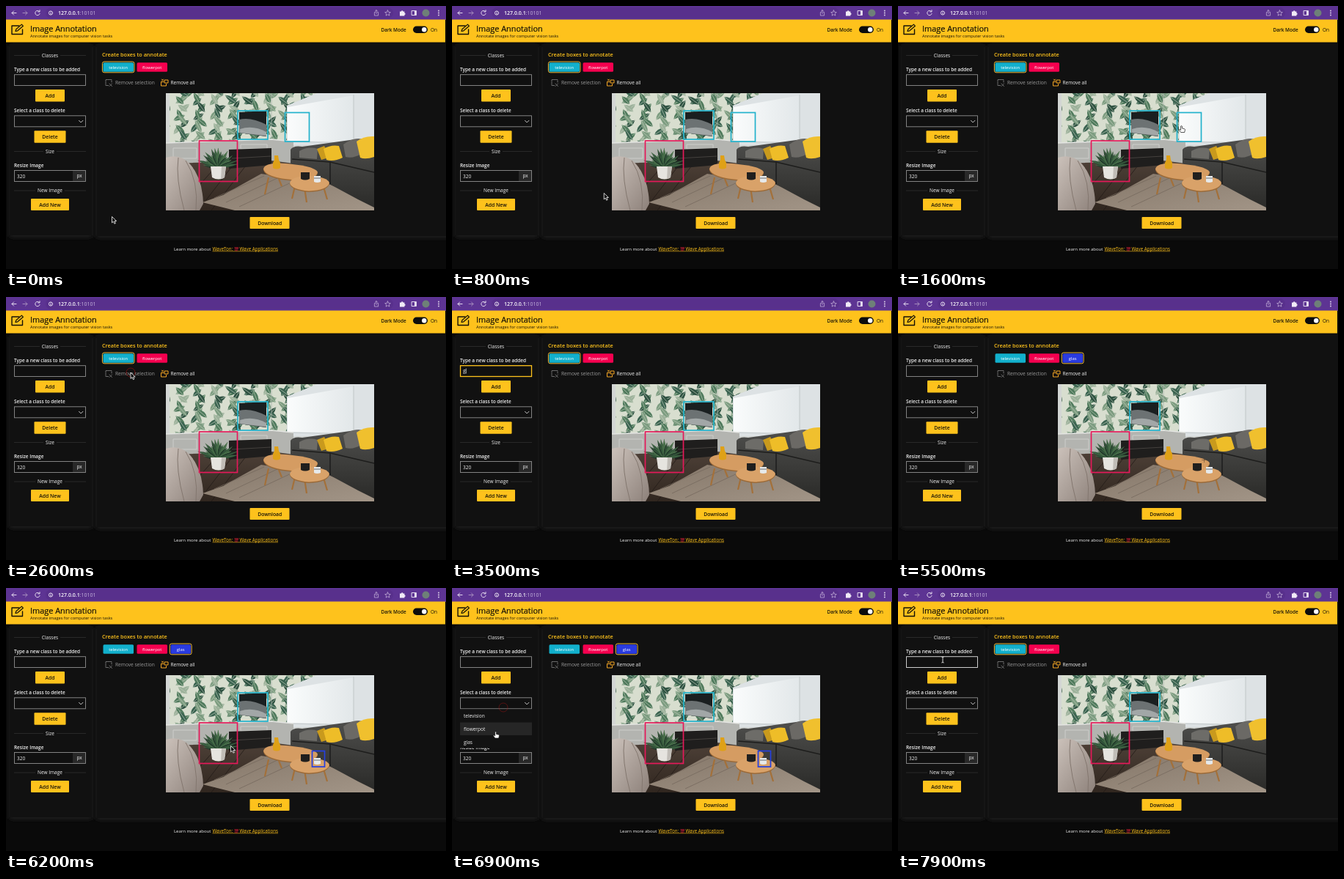
An HTML page that plays this animation: 600x359 px, repeating every 8 s.

```html
<!DOCTYPE html>
<html lang="en">
<head>
<meta charset="utf-8">
<title>Image Annotation</title>
<style>
  html, body { margin: 0; width: 100%; height: 100%; overflow: hidden; background: #0a0a0a; }
  svg { display: block; width: 100vw; height: 100vh; }
  text { font: 400 6.5px "Open Sans", "Noto Sans", sans-serif; fill: #f2f2f2; }
  .b { font-weight: 600; font-size: 6.45px; }
  .mid { text-anchor: middle; }
  .dark { fill: #151208; }
  .btn rect { fill: #fec21c; }
  .btn text { font-weight: 600; font-size: 6.8px; fill: #151208; text-anchor: middle; }
  .tag text { font-size: 5.9px; fill: #fff; text-anchor: middle; }
  .field { fill: #101010; stroke: #8e8e8e; stroke-width: .9; }
  .field.hover { stroke: #e0e0e0; }
  .field.focus { stroke: #fec21c; stroke-width: 1.3; }
  .rule { stroke: #303030; stroke-width: .8; }
  .line { fill: none; stroke-width: 1; stroke-linecap: round; stroke-linejoin: round; }
  .box { fill: none; stroke-width: 1.7; }
  .link { fill: #fec21c; }
  #removeSel text { fill: #9a9a9a; }
  #removeSel path { stroke: #707070; }
  #removeSel.on text { fill: #f2f2f2; }
  #removeSel.on path { stroke: #fec21c; }
</style>
</head>
<body>
<svg viewBox="0 0 600 359" preserveAspectRatio="none">
  <defs>
    <filter id="glow" x="-10%" y="-10%" width="120%" height="120%"><feGaussianBlur stdDeviation="3.5"/></filter>
    <filter id="soft"><feGaussianBlur stdDeviation=".6"/></filter>
    <clipPath id="photoClip"><rect x="218" y="119" width="284" height="160"/></clipPath>
    <clipPath id="paperClip"><path id="paper" d="M223 119H424L383 136V184L362 182L223 187Z"/></clipPath>
    <linearGradient id="floor" x2="0" y2="1"><stop stop-color="#4d4037"/><stop offset="1" stop-color="#30261f"/></linearGradient>
    <linearGradient id="pane" x2="1" y2="0"><stop stop-color="#fafcfc"/><stop offset="1" stop-color="#e2e7e9"/></linearGradient>
    <linearGradient id="bag" x2="1" y2="1"><stop stop-color="#cbc1ba"/><stop offset="1" stop-color="#8d817a"/></linearGradient>
    <linearGradient id="sofa" x2="0" y2="1"><stop stop-color="#4e4e4c"/><stop offset="1" stop-color="#2b2b29"/></linearGradient>
    <linearGradient id="rug" x2="1" y2="1"><stop stop-color="#857769"/><stop offset="1" stop-color="#a29587"/></linearGradient>
  </defs>

  <rect width="600" height="359" fill="#0a0a0a"/>
  <g filter="url(#glow)" fill="#222">
    <rect x="5" y="54" width="112" height="261"/>
    <rect x="124" y="54" width="480" height="262"/>
  </g>
  <g fill="#111">
    <rect x="5" y="52" width="112" height="261"/>
    <rect x="124" y="52" width="476" height="262"/>
  </g>

  <!-- browser bar -->
  <rect width="600" height="19" fill="#5d3493"/>
  <rect x="54" y="2" width="474" height="15" rx="7.5" fill="#58308c"/>
  <g class="line" stroke="#e4d9ee">
    <path d="M14 9.5H8m2.6-2.6L8 9.5l2.6 2.6"/>
    <path d="M23 9.5h6m-2.6-2.6L29 9.5l-2.6 2.6" stroke="#a58bbd"/>
    <path d="M45.6 7.6a3.2 3.2 0 1 0 .5 2.8M46 5.6v2.3h-2.3"/>
    <circle cx="61" cy="9.5" r="2.6"/><path d="M61 9.3v1.6M61 7.8v.1"/>
    <g stroke="#bfaad6" stroke-width=".8">
      <path d="M503.400 8.500h-1v4.500h5.200v-4.500h-1M505 10.500V5.500m-1.500 1.500 1.500-1.500 1.500 1.500"/>
      <path d="M520.500 5.800l1.100 2.500 2.700.3-2 1.800.6 2.700-2.400-1.400-2.400 1.400.6-2.700-2-1.800 2.700-.3z"/>
    </g>
    <rect x="553.500" y="6.500" width="6" height="6"/><path d="M558 7v5" stroke-width="2"/>
  </g>
  <path d="M537 7.500h2a1.200 1.200 0 1 1 2.400 0h2v2a1.200 1.200 0 1 1 0 2.400v1.600H537z" fill="#f1eaf7"/>
  <circle cx="572.500" cy="9.500" r="5" fill="#6e8078"/>
  <g fill="#e4d9ee"><circle cx="590" cy="6.500" r=".9"/><circle cx="590" cy="9.500" r=".9"/><circle cx="590" cy="12.500" r=".9"/></g>
  <text x="71" y="12" style="font-size:7px;font-weight:600;fill:#fff">127.0.0.1<tspan font-weight="400" fill="#c9b8de">:10101</tspan></text>

  <!-- header -->
  <rect y="18.500" width="599" height="31" fill="#fec21c"/>
  <g class="line" stroke="#151208">
    <path d="M18 27H8v11.500H22.500V32" stroke-width="1.400"/>
    <path d="M13 34.500l.8-2.800 7.600-6.600 2 2.200-7.600 6.500z" stroke-width="1.200"/>
  </g>
  <text class="dark" x="33" y="35" style="font-size:10.900px" stroke="#151208" stroke-width=".2">Image Annotation</text>
  <text class="dark" x="33" y="43.200" style="font-size:5.650px">Annotate images for computer vision tasks</text>
  <text class="b dark" x="511.500" y="35">Dark Mode</text>
  <rect x="555" y="27.500" width="20" height="9.500" rx="4.750" fill="#0c0c0c"/>
  <circle cx="570.300" cy="32.200" r="3.200" fill="#fff"/>
  <text class="dark" x="579" y="35">On</text>

  <!-- side panel -->
  <path class="rule" d="M11 67.500H46M74 67.500h35M11 198.500H51M69 198.500h40M11 252H40M80 252h29"/>
  <text class="mid" x="60" y="70">Classes</text>
  <text class="b" x="11" y="88.800">Type a new class to be added</text>
  <rect class="field" id="input" x="11.500" y="93.700" width="97" height="14.800"/>
  <text id="typed" x="15" y="103.200"></text>
  <path id="caret" d="M0 97.500v7" stroke="#fff" stroke-width=".7"/>
  <g class="btn"><rect x="40" y="114" width="40" height="16.500" rx="1"/><text x="60" y="124.700">Add</text></g>
  <text class="b" x="11" y="145">Select a class to delete</text>
  <rect class="field" x="11.500" y="149.800" width="97" height="15"/>
  <text id="picked" x="15" y="159.600"></text>
  <path class="line" d="M99.500 156.300l2.700 2.700 2.700-2.700" stroke="#c4c4c4" stroke-width=".8"/>
  <g class="btn"><rect x="38.500" y="170.300" width="43" height="16.500" rx="1"/><text x="60" y="180.900">Delete</text></g>
  <text class="mid" x="60" y="200.800">Size</text>
  <text class="b" x="11" y="219.500">Resize Image</text>
  <rect class="field" x="11.500" y="224.500" width="97" height="15"/>
  <rect x="91" y="225" width="17" height="14" fill="#282828"/>
  <text x="15" y="234.500" fill="#ccc">320</text>
  <text x="96.500" y="234" fill="#ccc">px</text>
  <text class="mid" x="60" y="254.300">New Image</text>
  <g class="btn"><rect x="34" y="263" width="52" height="16" rx="1"/><text x="60" y="273.600">Add New</text></g>
  <g id="menu">
    <rect x="11" y="165.500" width="98" height="53" fill="#121212"/>
    <rect id="hover" x="11" width="98" height="17.500" fill="#262626"/>
    <text x="16" y="177">television</text>
    <text x="16" y="195">flowerpot</text>
    <text x="16" y="213">glas</text>
  </g>

  <!-- annotator -->
  <text class="b link" x="131" y="69" style="font-size:7.300px">Create boxes to annotate</text>
  <g class="tag">
    <rect x="132.500" y="77.200" width="41.500" height="12.500" rx="1.500" fill="#12b0cc"/><text x="153.200" y="85.600">television</text>
    <rect x="178.500" y="77.200" width="41.500" height="12.500" rx="1.500" fill="#f5004f"/><text x="199.200" y="85.600">flowerpot</text>
    <g id="glasTag"><rect x="224.500" y="77.200" width="27.500" height="12.500" rx="1.500" fill="#2a3be0"/><text x="238.200" y="85.600">glas</text></g>
    <rect id="active" y="76" height="14.800" rx="2.500" fill="none" stroke="#eebb3c" stroke-width="1"/>
  </g>
  <g id="removeSel">
    <path class="line" d="M144 104v-3.500h-8v8h4M141 106l3.500 3.500M144.500 106l-3.500 3.500" stroke-dasharray="2 1"/>
    <text x="149" y="106.800" style="font-size:6.600px">Remove selection</text>
  </g>
  <path class="line" stroke="#f5a623" d="M215 103.500h-3.500v5.500h7v-2.500M216.500 101h4.500v4h-4.500zM212.500 100l2 2m0-2l-2 2"/>
  <text x="224.500" y="106.800">Remove all</text>

  <g clip-path="url(#photoClip)">
   <g filter="url(#soft)">
    <rect x="218" y="119" width="284" height="160" fill="#d3d6d4"/>
    <use href="#paper" fill="#d8decf"/>
    <g id="leaves" clip-path="url(#paperClip)"></g>
    <path d="M362 119V210" stroke="#aab4ab" stroke-width=".8"/>
    <path d="M424 119H502V190H383V136Z" fill="#dde2e4"/>
    <path d="M384 138L474 122V186L384 184Z" fill="url(#pane)"/>
    <path d="M474 121v66M384 185l90 2" stroke="#c6ccce" stroke-width="1.200"/>
    <path d="M218 187L362 182L392 185V216H218Z" fill="#b3b4b0"/>
    <path d="M218 187L362 182L392 185" fill="none" stroke="#e4e5e2" stroke-width="1.500"/>
    <path d="M228 194h32v14h-32zM320 189h36v6h-36z" fill="none" stroke="#cdcecb"/>
    <path d="M218 215L362 211L400 216L502 250V279H218Z" fill="url(#floor)"/>
    <path d="M262 279L312 214M280 279L330 214M250 260L290 215" stroke="#221b17" stroke-width=".8"/>
    <path d="M296 258L348 229L440 243L502 268V279H312L268 268Z" fill="url(#rug)"/>
    <path d="M284 262L352 232M300 268L372 234M318 274L395 238" stroke="#75695d" stroke-width=".8"/>
    <path d="M304 196L362 194V217L304 222Z" fill="#1f1e1d"/>
    <path d="M308 208L361 205" stroke="#45413e"/>
    <path d="M318 145L355 143V178L318 173Z" fill="#1a1f20"/>
    <path d="M318 155Q334 151 355 162V178L318 173Z" fill="#6c7273"/>
    <path d="M319 168q18-6 36 4v5l-36-4z" fill="#a2a7a7"/>
    <path d="M388 196Q392 190 404 192L476 182Q494 180 502 184V275L480 264L441 243L388 216Z" fill="url(#sofa)"/>
    <path d="M390 209L442 213L502 227M442 213V243" fill="none" stroke="#1d1d1c" stroke-width="1.500"/>
    <path d="M400 198q12-7 25-3l-1 14-24-2z" fill="#6d6c68"/>
    <path d="M424 195l10-4 9 15-13 4z" fill="#c99a1d"/>
    <path d="M433 195q10-6 21-4l5 16q-12 6-22 3z" fill="#eebd28"/>
    <path d="M460 189q12-9 22-8l4 20q-13 8-23 5z" fill="#6b6965"/>
    <path d="M478 185q10-8 24-7v28q-12 4-19 1z" fill="#f0c02e"/>
    <path d="M218 207Q239 201 252 217Q268 236 269 270L264 279H218Z" fill="url(#bag)"/>
    <path d="M235 207q-4 28 8 72M245 211q18 28 14 68" fill="none" stroke="#83776f" stroke-width="1"/>
    <path d="M358 234L353 257M405 234L410 268M372 236L376 246M394 246L390 263M433 247L438 264" stroke="#a3703a" stroke-width="2.200"/>
    <path id="tableA" d="M351 224Q352 216 374 216Q420 219 425 228Q424 238 394 239Q354 236 351 224Z" fill="#9b6a38"/>
    <use href="#tableA" y="-1.500" style="filter:brightness(1.45) saturate(.8)"/>
    <path id="tableB" d="M387 243Q389 234 412 233Q439 235 441 243Q438 253 413 254Q389 252 387 243Z" fill="#9b6a38"/>
    <use href="#tableB" y="-1.500" style="filter:brightness(1.5) saturate(.75)"/>
    <path d="M366 204h5l1 6 2 4v7q-5 3-10 0v-7l2-4z" fill="#dfa117"/>
    <path d="M402 227h12v9q-6 3-12 0z" fill="#201f1e"/>
    <path d="M420 232h9v8q-5 2-9 0z" fill="#e6e9ea"/>
    <path d="M420 235h9" stroke="#6a6d70"/>
    <g id="plant"></g>
    <path d="M279 219h21l-2 15q-8 5-17 0z" fill="#e6e4df"/>
    <path d="M294 219h6l-2 15q-2 2-5 2z" fill="#c1bdb7"/>
   </g>
   <rect class="box" x="316" y="143" width="41" height="39" stroke="#22b2cc"/>
   <rect class="box" x="263.500" y="184" width="52" height="55.500" stroke="#e4195a"/>
   <g id="tvBox">
     <rect class="box" x="380.500" y="145.500" width="33" height="39.500" stroke="#22b2cc"/>
     <path id="grips" d="M380.500 145.500h0M413.500 145.500h0M380.500 185h0M413.500 185h0" stroke="#22b2cc" stroke-width="4.500" stroke-linecap="square"/>
   </g>
   <rect class="box" id="glasBox" x="417.500" y="222.500" stroke="#2540e0"/>
  </g>
  <g class="btn"><rect x="332.500" y="288" width="54" height="16" rx="1"/><text x="359.700" y="298.600">Download</text></g>

  <!-- footer -->
  <text x="229" y="333.600" style="font-size:6px">Learn more about</text>
  <text class="link" x="281.500" y="333.600" style="font-size:6.200px">WaveTon:</text>
  <text class="link" x="318.500" y="333.600" style="font-size:6.200px">Wave Applications</text>
  <path d="M281.500 334.800H371" stroke="#fec21c" stroke-width=".6"/>
  <text x="311" y="331.800" style="font-size:3.600px;font-weight:700;font-style:italic;fill:#e0203a">100</text>
  <path d="M311.500 333h5M312.500 334h3" stroke="#e0203a" stroke-width=".6"/>

  <circle id="ring" r="6" fill="none" stroke="#b81414" stroke-width=".8"/>
  <g id="cursor">
    <path id="arrow" d="M0 0V8.400L2 6.600L3.400 9.700L4.900 9L3.500 6H6.200Z" fill="#0a0a0a" stroke="#fff" stroke-width=".8"/>
    <path id="hand" d="M-.9 0Q0-1 .9 0V3l3.200.7q1 .4.8 1.500L4.200 8.500H-.8L-3.200 5.200q.2-1.200 1.300-.6l1 .8z" fill="#fff" stroke="#111" stroke-width=".7"/>
    <path id="beam" d="M-1.600-4Q0-4 0-3Q0-4 1.600-4M0-3V3M-1.600 4Q0 4 0 3Q0 4 1.600 4" fill="none" stroke="#f4f4f4" stroke-width=".9"/>
    <path id="cross" d="M-3.500 0h7M0-3.500v7" stroke="#4a3a28" stroke-width=".5"/>
  </g>
</svg>
<script>
const $ = id => document.getElementById(id);
const LOOP = 8000, STEP = 100;

function random(seed) {
  return () => (seed = (seed * 16807) % 2147483647) / 2147483647;
}

function leaf(parent, x, y, angle, length, width, color, rib) {
  const g = document.createElementNS("http://www.w3.org/2000/svg", "g");
  const mid = length * .45;
  g.setAttribute("transform", `translate(${x} ${y}) rotate(${angle})`);
  g.innerHTML = `<path d="M0 0Q${mid} ${-width} ${length} 0Q${mid} ${width} 0 0" fill="${color}"/>` +
    `<path d="M0 0H${length}" stroke="${rib}" stroke-width=".6"/>`;
  parent.append(g);
}

function drawPhoto() {
  const rnd = random(41), greens = ["#3a6350", "#4f7a5c", "#7c9c80", "#9db29b", "#2f5242"];
  for (let row = 0; row < 8; row++)
    for (let col = 0; col < 17; col++) {
      const x = 222 + col * 12 + (row % 2) * 6 + rnd() * 4, y = 122 + row * 10 + rnd() * 4;
      const angle = (row + col) % 2 ? -60 + rnd() * 40 : -150 + rnd() * 40;
      leaf($("leaves"), x, y, angle, 15 + rnd() * 5, 6.5, greens[Math.floor(rnd() * 5)], "#c3cfbd");
    }
  const dark = ["#20392a", "#2f5238", "#456b48"];
  for (let i = 0; i < 17; i++)
    leaf($("plant"), 289.5, 220, -172 + i * 10.2, 18 + rnd() * 12, 4.5, dark[i % 3], "#567a52");
}

// time, x, y, pointer shape from then on
const path = [
  [0, 144.5, 287.5, "arrow"], [500, 144.5, 287.5, "arrow"], [1400, 386.5, 164, "hand"],
  [1900, 386.5, 164, "arrow"], [2300, 170, 103, "hand"], [2600, 170, 103, "arrow"],
  [3000, 61, 101, "beam"], [3400, 61, 101, ""], [4000, 61, 101, "beam"],
  [4200, 60, 122, "hand"], [4400, 60, 122, "arrow"], [4700, 277.5, 104, "arrow"],
  [4900, 238, 84, "hand"], [5200, 238, 84, "arrow"], [5500, 417.5, 222.5, "cross"],
  [5900, 435, 244, "cross"], [6000, 435, 244, "arrow"], [6500, 70, 163, "hand"],
  [6700, 70, 163, "hand"], [6900, 59.5, 196.5, "hand"], [7000, 59.5, 209, "hand"],
  [7100, 59.5, 209, "hand"], [7300, 60, 177, "hand"], [7500, 60, 177, "arrow"],
  [7800, 61, 98, "beam"], [8000, 61, 98, "beam"]
];
const clicks = [1700, 2400, 3100, 4300, 5000, 6600, 7100, 7400];
const keys = [[3500, "g"], [3600, "gl"], [3800, "gla"], [3900, "glas"], [4300, ""]];

const smooth = k => k * k * (3 - 2 * k);

function pointer(t) {
  const i = Math.min(path.findLastIndex(p => p[0] <= t), path.length - 2);
  const [t0, x0, y0, shape] = path[i], [t1, x1, y1] = path[i + 1];
  const e = smooth((t - t0) / (t1 - t0));
  return { x: x0 + (x1 - x0) * e, y: y0 + (y1 - y0) * e, shape };
}

const set = (id, attrs) => { for (const a in attrs) $(id).setAttribute(a, attrs[a]); };
const show = (id, on) => set(id, { visibility: on ? "inherit" : "hidden" });

function draw(t) {
  const within = (a, b) => t >= a && t < b;

  const p = pointer(t);
  set("cursor", { transform: `translate(${p.x} ${p.y})` });
  for (const s of ["arrow", "hand", "beam", "cross"]) show(s, s === p.shape);

  const click = clicks.find(c => t >= c && t <= c + 300);
  show("ring", click !== undefined);
  if (click !== undefined) {
    const at = pointer(click);
    set("ring", { cx: at.x, cy: at.y, opacity: 1 - (t - click) / 600 });
  }

  show("tvBox", t < 2400);
  show("grips", within(1700, 2400));
  set("removeSel", { class: within(1700, 2400) ? "on" : "" });

  const text = (keys.findLast(k => k[0] <= t) || [0, ""])[1];
  const focused = within(3100, 4300);
  $("typed").textContent = text;
  set("input", { class: "field" + (focused ? " focus" : t >= 7800 ? " hover" : "") });
  show("caret", focused);
  set("caret", { transform: `translate(${15.6 + (text ? $("typed").getComputedTextLength() : 0)} 0)` });

  show("glasTag", within(4300, 7400));
  const glas = within(5000, 7400);
  set("active", glas ? { x: 223.3, width: 29.8 } : { x: 131.4, width: 43.6 });

  const size = smooth(Math.min(1, Math.max(0, (t - 5500) / 400)));
  show("glasBox", t > 5500 && t < 7400);
  set("glasBox", { width: 17 * size, height: 21.5 * size });

  show("menu", within(6600, 7100));
  const row = Math.floor((p.y - 165.5) / 18);
  show("hover", within(6600, 7100) && row >= 0);
  set("hover", { y: 165.5 + 18 * Math.max(0, row) });
  $("picked").textContent = within(7100, 7400) ? "glas" : "";
}

drawPhoto();
const start = performance.now();
function tick() {
  const t = (performance.now() - start) % LOOP;
  draw(Math.floor(t / STEP) * STEP);
  requestAnimationFrame(tick);
}
tick();
</script>
</body>
</html>
```
